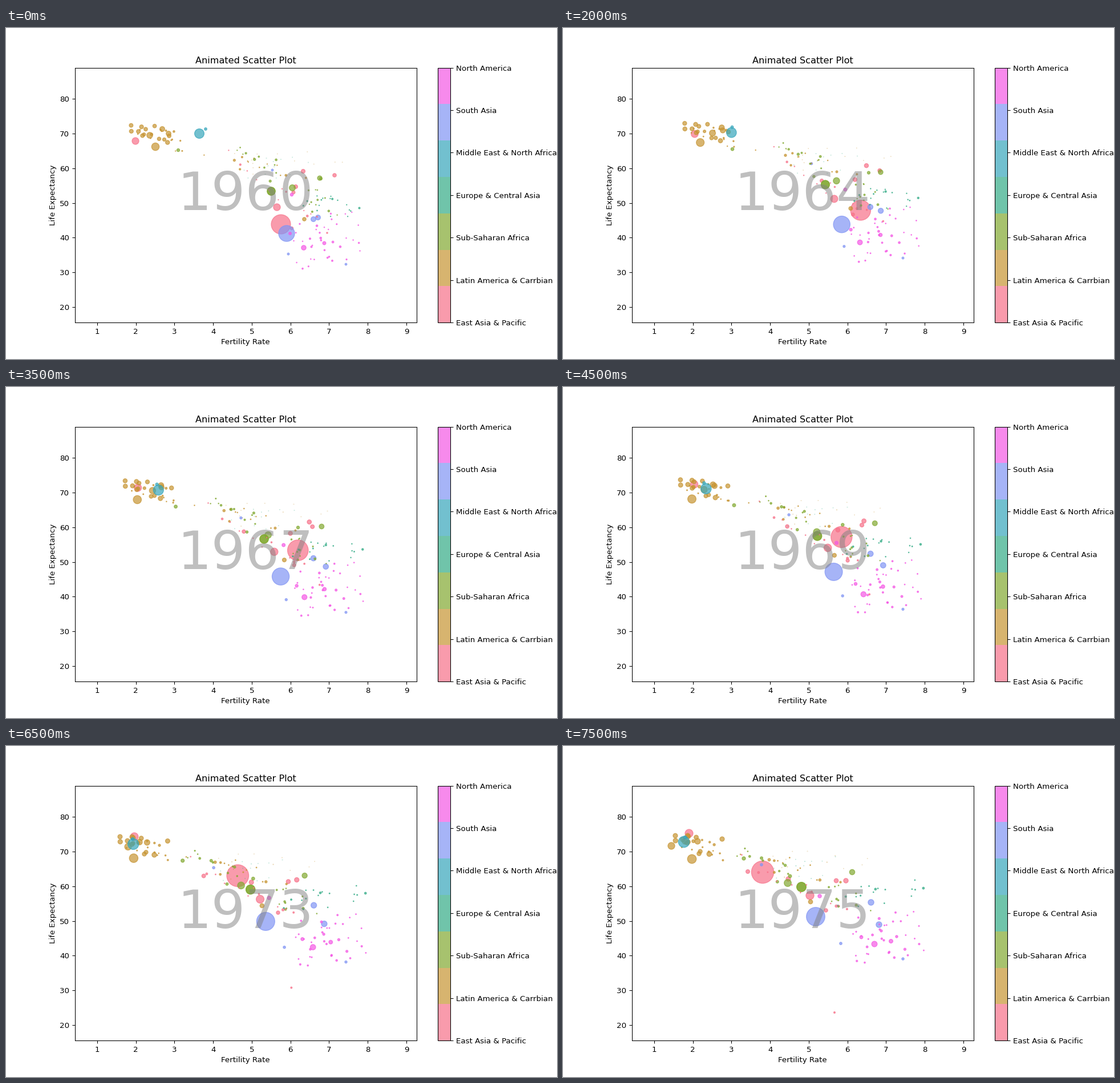
A matplotlib script for the animation above (8000 ms loop, 966x580 px).

```python
import numpy as np
import matplotlib.pyplot as plt
from matplotlib.animation import FuncAnimation
from matplotlib.cm import ScalarMappable
from matplotlib.colors import ListedColormap, Normalize

W, H, DPI = 966, 580, 96.6
YEARS, START = 16, 1960
ALPHA, EDGE = 0.7, 1.0
GROWTH = np.linspace(1, 1.15, YEARS)  # population growth, as bubble radius
REGIONS = ["East Asia & Pacific", "Latin America & Carrbian", "Sub-Saharan Africa",
           "Europe & Central Asia", "Middle East & North Africa", "South Asia",
           "North America"]
COLORS = ["#f77189", "#c69432", "#82a931", "#34ac87", "#36a6bb", "#8094f4", "#f558e5"]
PINK, TAN, OLIVE, GREEN, TEAL, BLUE, MAGENTA = range(7)

t = np.arange(YEARS)
rng = np.random.default_rng(12)
paths, radii, hues = [], [], []


def bubble(hue, radius, *points):
    """Smooth path through stage points that are evenly spaced in time."""
    n = len(points)
    curve = np.polyfit(np.linspace(0, YEARS - 1, n), np.array(points), n - 1)
    paths.append(np.vander(t, n) @ curve)
    radii.append(radius * GROWTH)
    hues.append(COLORS[hue])


def cloud(hue, n, r_min, r_max, start, end, spread):
    """Small bubbles scattered along a line that drifts from start to end."""
    for _ in range(n):
        u, size = rng.random(2)
        off = rng.uniform(-1, 1, 2) * spread
        ends = [np.array(a) * (1 - u) + np.array(b) * u for a, b in (start, end)]
        wobble = rng.normal(0, 4, 2)
        bubble(hue, r_min + (r_max - r_min) * size ** 3,
               ends[0] + off, ends[1] + off + wobble)


# Largest countries
bubble(PINK, 17.6, (482, 344), (522, 309), (472, 252), (350, 221))
bubble(PINK, 6.6, (227, 198), (231, 175), (221, 153))
bubble(PINK, 6.7, (475, 314), (469, 287), (433, 262))
bubble(PINK, 3.8, (576, 258), (534, 244), (479, 236))
bubble(PINK, 4.1, (521, 251), (531, 236), (496, 236))
bubble(PINK, 4.0, (508, 278), (495, 255), (395, 233))
bubble(PINK, 3.3, (501, 351), (504, 310), (461, 288))
bubble(PINK, 3.5, (504, 288), (411, 251), (324, 220))
bubble(PINK, 1.8, (563, 359), (547, 350), (476, 467))
bubble(TAN, 7.3, (262, 208), (229, 197), (226, 198))
bubble(TAN, 5.8, (252, 188), (255, 181), (190, 175))
bubble(TAN, 5.0, (274, 177), (270, 172), (214, 167))
bubble(TAN, 4.9, (285, 185), (271, 175), (236, 167))
bubble(TAN, 4.0, (286, 189), (290, 176), (279, 163))
bubble(TAN, 3.8, (523, 335), (485, 301), (434, 273))
for _ in range(2):
    bubble(OLIVE, 7.7, (465, 286), (451, 265), (418, 247))
bubble(OLIVE, 6.0, (502, 280), (456, 258), (394, 240))
bubble(OLIVE, 4.6, (550, 263), (552, 243), (507, 221))
bubble(OLIVE, 3.0, (552, 264), (507, 245), (398, 228))
bubble(OLIVE, 3.2, (302, 214), (298, 209), (317, 197))
bubble(BLUE, 14.7, (492, 360), (480, 330), (443, 299))
bubble(BLUE, 5.0, (539, 335), (539, 298), (540, 274))
bubble(BLUE, 5.0, (547, 332), (561, 314), (554, 313))
bubble(BLUE, 2.5, (495, 396), (487, 346))
bubble(BLUE, 2.4, (596, 414), (596, 373))
bubble(BLUE, 2.5, (467, 249), (408, 228), (348, 208))
bubble(MAGENTA, 4.8, (522, 385), (524, 367), (546, 347))
bubble(MAGENTA, 3.5, (558, 377), (559, 353), (575, 342))
bubble(MAGENTA, 3.3, (501, 292), (485, 276), (450, 263))
bubble(MAGENTA, 3.0, (498, 360), (523, 335))

# Everyone else, region by region
cloud(TAN, 22, 1.4, 4.6, [(230, 178), (300, 192)], [(206, 165), (270, 186)], (16, 13))
cloud(TAN, 15, 1.2, 2.6, [(295, 222), (540, 255)], [(258, 190), (500, 232)], (12, 14))
cloud(OLIVE, 22, 1.2, 2.7, [(390, 205), (585, 325)], [(288, 180), (540, 285)], (16, 18))
cloud(GREEN, 17, 1.2, 3.3, [(530, 300), (612, 340)], [(490, 265), (640, 265)], (20, 28))
cloud(MAGENTA, 36, 1.3, 2.4, [(515, 390), (605, 355)], [(515, 345), (615, 325)], (28, 40))
cloud(PINK, 12, 1.2, 2.4, [(340, 185), (540, 340)], [(255, 172), (495, 290)], (14, 14))
cloud(TAN, 12, 0.7, 0.8, [(390, 240), (590, 235)], [(350, 212), (540, 200)], (10, 20))
cloud(GREEN, 12, 0.7, 0.8, [(400, 245), (590, 245)], [(350, 220), (550, 205)], (10, 20))
bubble(TEAL, 9.0, (339, 185), (263, 180), (212, 168))
bubble(TEAL, 2.9, (350, 177), (260, 170), (214, 160))

# One stray reading in 1971
bubble(TAN, 7.5, (248, 256))
paths[-1][t != 1971 - START] = np.nan

# Stage pixels to axis units
data = np.array(paths)
data[..., 0] = 1 + (data[..., 0] - 160) / 67.75
data[..., 1] = 80 - (data[..., 1] - 123.5) / 6.1
sizes = np.maximum(2 * np.array(radii) * 72 / DPI - EDGE, 0.2) ** 2

fig, ax = plt.subplots(figsize=(W / DPI, H / DPI), dpi=DPI)
dots = ax.scatter(data[:, 11, 0], data[:, 11, 1], s=sizes[:, 11], c=hues,
                  alpha=ALPHA, linewidths=EDGE)
year = ax.text(0.5, 0.5, str(START), transform=ax.transAxes, fontsize=70,
               color="gray", alpha=0.5, ha="center", va="center")
ax.set(xlim=(0.421, 9.261), ylim=(15.62, 88.84), xlabel="Fertility Rate",
       ylabel="Life Expectancy", title="Animated Scatter Plot")
bar = fig.colorbar(ScalarMappable(Normalize(0, 6), ListedColormap(COLORS)),
                   ax=ax, alpha=ALPHA)
bar.set_ticks(range(7), labels=REGIONS)


def update(i):
    dots.set_offsets(data[:, i])
    dots.set_sizes(sizes[:, i], DPI)
    year.set_text(str(START + i))
    return dots, year


anim = FuncAnimation(fig, update, frames=YEARS, interval=500, repeat=True, repeat_delay=0)
plt.show()
```
